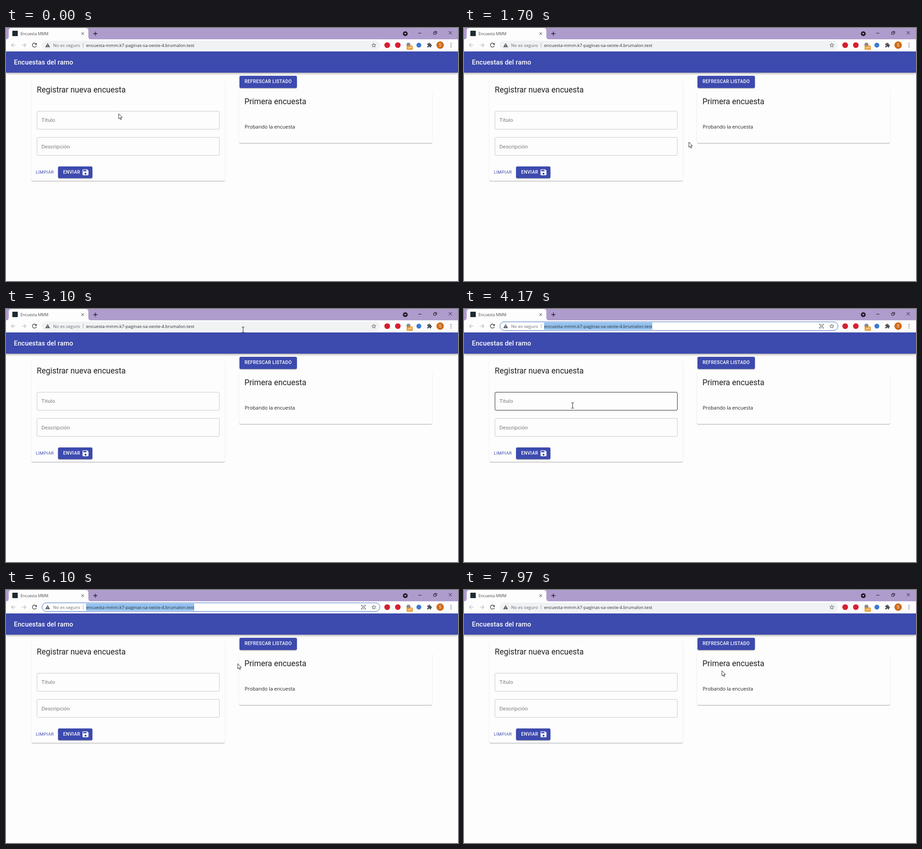
An HTML page that plays this animation: 999x561 px, repeating every 8 s.

```html
<!DOCTYPE html>
<html lang="es">
<head>
<meta charset="utf-8">
<title>Encuestas</title>
<style>
  html, body { margin: 0; width: 100%; height: 100%; overflow: hidden; background: #fdfdfd; }
  .box { position: absolute; box-sizing: border-box; border-radius: 3px; }
  .strip { left: 0; top: 0; width: 999px; height: 25px; border-radius: 0; background: #ae9ccd; }
  .bar { left: 0; top: 52px; width: 999px; height: 47px; border-radius: 0; background: #3d4aae;
    box-shadow: 0 1.5px 3px -.7px #0003, 0 3px 3.7px #00000024, 0 .7px 7px #0000001f; }
  .address { left: 79px; top: 28px; width: 748px; height: 20px; border-radius: 10px; background: #f1f2f4; }
  .address.on { background: #fff; border: 1.6px solid #3f6cc0; }
  .selection { left: 177px; top: 30px; width: 239px; height: 16px; border-radius: 0; background: #93c1ef; }
  .card { background: #fdfdfd; box-shadow: 0 1.5px .7px -.7px #0004, 0 .7px .7px #00000024, 0 .7px 2.2px #0000001f; }
  .button { background: #3d4aae; box-shadow: 0 2.2px .7px -1.5px #0003, 0 1.5px 1.5px #00000024, 0 .7px 3.7px #0000001f; }
  .field { left: 68px; width: 404px; height: 41px; border: 1px solid #c8c8c2; }
  .field.on { border-color: #2a2a2e; }
  svg { position: absolute; left: 0; top: 0; }
  .ui { font-family: "Open Sans", "Noto Sans", sans-serif; }
  .app { font-family: Roboto, sans-serif; }
  .h5 { font-size: 17.55px; fill: #212121; }
  .label { font-size: 11.7px; letter-spacing: .11px; fill: #7a7a7a; }
  .caps { font-size: 10.24px; font-weight: 500; letter-spacing: .0286em; fill: #fff; }
  .line { fill: none; stroke: #1e1a24; stroke-width: 1; }
</style>
</head>
<body>
<div class="box strip"></div>
<div class="box address" id="address"></div>
<div class="box selection" id="selection"></div>
<div class="box bar"></div>
<div class="box card" style="left:56px;top:113px;width:428px;height:226px"></div>
<div class="box card" style="left:515px;top:139px;width:427px;height:116px"></div>
<div class="box field" id="title" style="top:184px"></div>
<div class="box field" id="detail" style="top:242px"></div>
<div class="box button" style="left:516px;top:106px;width:127px;height:27px"></div>
<div class="box button" style="left:115px;top:307px;width:76px;height:26px"></div>

<svg width="999" height="561" viewBox="0 0 999 561">
  <!-- tab strip -->
  <path fill="#fdfdfd" d="M0 25Q6 25 6 19V6Q6 0 12 0H176Q182 0 182 6V19Q182 25 188 25Z"/>
  <rect id="icon" x="14" y="6" width="12" height="12" rx="1" fill="#1d2a33"/>
  <g id="iconBusy">
    <circle cx="20.5" cy="12" r="3.7" fill="#1d2a33"/>
    <circle cx="20.5" cy="12" r="5" fill="none" stroke="#9fb4c6" stroke-width=".9"/>
  </g>
  <text class="ui" x="32" y="15.5" font-size="8.64" fill="#4a4a50">Encuesta MMM</text>
  <path class="line" d="M166.8 9.8l5.4 5.4m0-5.4l-5.4 5.4" stroke-width="1.2"/>
  <path class="line" d="M193 12.5h9m-4.500-4.500v9" style="stroke-width:1.3"/>
  <circle cx="882.500" cy="12.500" r="5.300" fill="#1e1a24"/>
  <path fill="#cfc3e4" d="M879.800 11.200h5.400l-2.700 3.200z"/>
  <path class="line" d="M911 11.500h7M945 9.500h5v4.500h-5zM947 9.500v-2h5v4.500h-2M978.500 7l7 7m0-7l-7 7"/>

  <!-- toolbar -->
  <g fill="none" stroke="#b4b4ba" stroke-width="1.200">
    <path d="M21 38h-9m4.200-4.200l-4.200 4.200 4.200 4.200"/>
    <path d="M35 38h9m-4.200-4.200l4.200 4.200-4.200 4.200"/>
  </g>
  <path id="reload" fill="#45464b" transform="translate(55.200 30.300) scale(.64)" d="M17.650 6.350C16.200 4.900 14.210 4 12 4c-4.420 0-7.990 3.580-7.990 8s3.570 8 7.990 8c3.730 0 6.840-2.550 7.730-6h-2.080c-.820 2.330-3.040 4-5.650 4-3.310 0-6-2.690-6-6s2.690-6 6-6c1.660 0 3.140.690 4.220 1.780L13 11h7V4z"/>
  <path id="stop" class="line" style="stroke:#45464b;stroke-width:1.400" d="M58.700 33.700l8.600 8.600m0-8.600l-8.600 8.600"/>
  <path fill="#5a5c62" d="M92 33.200l5.300 9.300H86.700z"/>
  <path stroke="#f1f2f4" d="M92 36.300v3m0 1v1.200"/>
  <text class="ui" x="104" y="41.800" font-size="9.780" fill="#66686e">No es seguro</text>
  <path stroke="#a8aab0" d="M170.500 33v10"/>
  <text class="ui" x="177" y="41.800" font-size="9.720" fill="#2c2d31">encuesta-mmm.k7-paginas-sa-oeste-4.brumalon.test</text>
  <g id="scan" fill="none" stroke="#55575d" stroke-width="1.100">
    <path d="M785.500 36v-2.500h2.500m4 0h2.500v2.500m0 4v2.500h-2.500m-4 0h-2.500v-2.500"/>
    <rect x="788" y="36" width="4" height="4"/>
  </g>
  <path fill="#55575d" transform="translate(806.500 31.600) scale(.54)" d="M22 9.240l-7.190-.620L12 2 9.190 8.630 2 9.240l5.460 4.730L5.820 21 12 17.270 18.180 21l-1.630-7.030zM12 15.400l-3.760 2.270 1-4.280-3.320-2.880 4.380-.380L12 6.100l1.710 4.040 4.380.380-3.320 2.880 1 4.280z"/>
  <circle cx="842.500" cy="38" r="6.300" fill="#d3202f"/>
  <circle cx="866" cy="38" r="6.200" fill="#d91f30"/>
  <circle cx="889.500" cy="37" r="4.500" fill="#8a8a8e"/>
  <rect x="885.500" y="39" width="13.500" height="9" rx="1.500" fill="#e8921d"/>
  <text class="ui" x="892.300" y="46.300" font-size="7.500" font-weight="600" text-anchor="middle" fill="#fff">off</text>
  <circle cx="912.500" cy="38" r="5.400" fill="#3c78d2"/>
  <path fill="#505157" transform="translate(930 32) scale(.5)" d="M20.500 11H19V7c0-1.100-.9-2-2-2h-4V3.500C13 2.120 11.880 1 10.500 1S8 2.120 8 3.500V5H4c-1.100 0-2 .9-2 2v3.800h1.500c1.490 0 2.700 1.210 2.700 2.700s-1.210 2.700-2.700 2.700H2V20c0 1.100.9 2 2 2h3.800v-1.500c0-1.490 1.210-2.700 2.700-2.700s2.700 1.210 2.700 2.700V22H17c1.100 0 2-.9 2-2v-4h1.500c1.380 0 2.500-1.120 2.500-2.500S21.880 11 20.500 11z"/>
  <circle cx="959.500" cy="38" r="8.200" fill="#cf6a16"/>
  <text class="app" x="959.500" y="41.300" font-size="9" text-anchor="middle" fill="#fff">S</text>
  <path stroke="#505157" stroke-width="2" stroke-linecap="round" d="M983.500 34h.01m-.01 4h.01m-.01 4h.01"/>

  <!-- page -->
  <g class="app">
    <text x="17.500" y="80.500" font-size="14.630" font-weight="500" letter-spacing=".11" fill="#fff">Encuestas del ramo</text>
    <text class="h5" x="68" y="143">Registrar nueva encuesta</text>
    <text class="h5" x="527" y="169">Primera encuesta</text>
    <text class="label" x="78.300" y="208">Titulo</text>
    <text class="label" x="78.300" y="266.700">Descripción</text>
    <text class="caps" x="527.300" y="122.400">REFRESCAR LISTADO</text>
    <text class="caps" x="126.300" y="323.200">ENVIAR</text>
    <text x="66" y="323" font-size="9.500" letter-spacing=".45" fill="#3d4aae">LIMPIAR</text>
  </g>
  <path fill="#fff" transform="translate(167 311.200) scale(.73)" d="M17 3H5c-1.110 0-2 .9-2 2v14c0 1.100.890 2 2 2h14c1.100 0 2-.9 2-2V7zm-5 16c-1.660 0-3-1.340-3-3s1.340-3 3-3 3 1.340 3 3-1.340 3-3 3zm3-10H5V5h10z"/>
  <text class="ui" x="527.500" y="222.500" font-size="11" fill="#212121">Probando la encuesta</text>

  <!-- pointer -->
  <g id="pointer">
    <path id="arrow" fill="#fff" stroke="#111" stroke-width=".9" d="M0 0V11.500L2.600 9.100 4.400 13.200 6.200 12.400 4.400 8.400H8Z"/>
    <path id="beam" class="line" d="M-3-6H-1L0-5.500 1-6H3M0-5.500V5.500M-3 6H-1L0 5.500 1 6H3"/>
  </g>
</svg>

<script>
const LOOP = 8000;
const FOCUS = [3350, 6700];
const LOADING = [6700, 7200];

// time, x, y
const path = [
  [0, 249, 190], [250, 249, 190], [1600, 497, 253], [1900, 497, 253],
  [3050, 524, 46], [3400, 524, 46], [4150, 240, 214], [4350, 240, 214],
  [5250, 603, 218], [5600, 603, 218], [6300, 490, 150], [6950, 455, 56],
  [7080, 455, 56], [7450, 500, 140], [7960, 570, 179], [LOOP, 570, 179]
];

// left, top, right, bottom
const zones = {
  address: [79, 28, 827, 49],
  title: [68, 193, 472, 225],
  detail: [68, 242, 472, 283],
  heading: [527, 153, 666, 173],
  body: [527, 210, 639, 228]
};

const el = id => document.getElementById(id);
const show = (id, on) => { el(id).style.visibility = on ? "visible" : "hidden"; };
const during = (t, [from, to]) => t >= from && t < to;
const inside = (x, y, [l, t, r, b]) => x >= l && x <= r && y >= t && y <= b;

function pointerAt(t) {
  const i = path.findIndex(p => p[0] > t);
  const [t0, x0, y0] = path[i - 1], [t1, x1, y1] = path[i];
  const u = (t - t0) / (t1 - t0), k = u * u * (3 - 2 * u);
  return [x0 + (x1 - x0) * k, y0 + (y1 - y0) * k];
}

function draw() {
  const t = performance.now() % LOOP;
  const [x, y] = pointerAt(t);
  const zone = Object.keys(zones).find(name => inside(x, y, zones[name]));
  el("pointer").setAttribute("transform", `translate(${x} ${y})`);
  show("beam", zone);
  show("arrow", !zone);
  for (const name of ["title", "detail"]) el(name).classList.toggle("on", zone === name);

  const focused = during(t, FOCUS), loading = during(t, LOADING);
  el("address").classList.toggle("on", focused);
  show("selection", focused);
  show("scan", focused);
  show("stop", loading);
  show("reload", !loading);
  show("iconBusy", loading);
  show("icon", !loading);
  requestAnimationFrame(draw);
}
draw();
</script>
</body>
</html>
```
